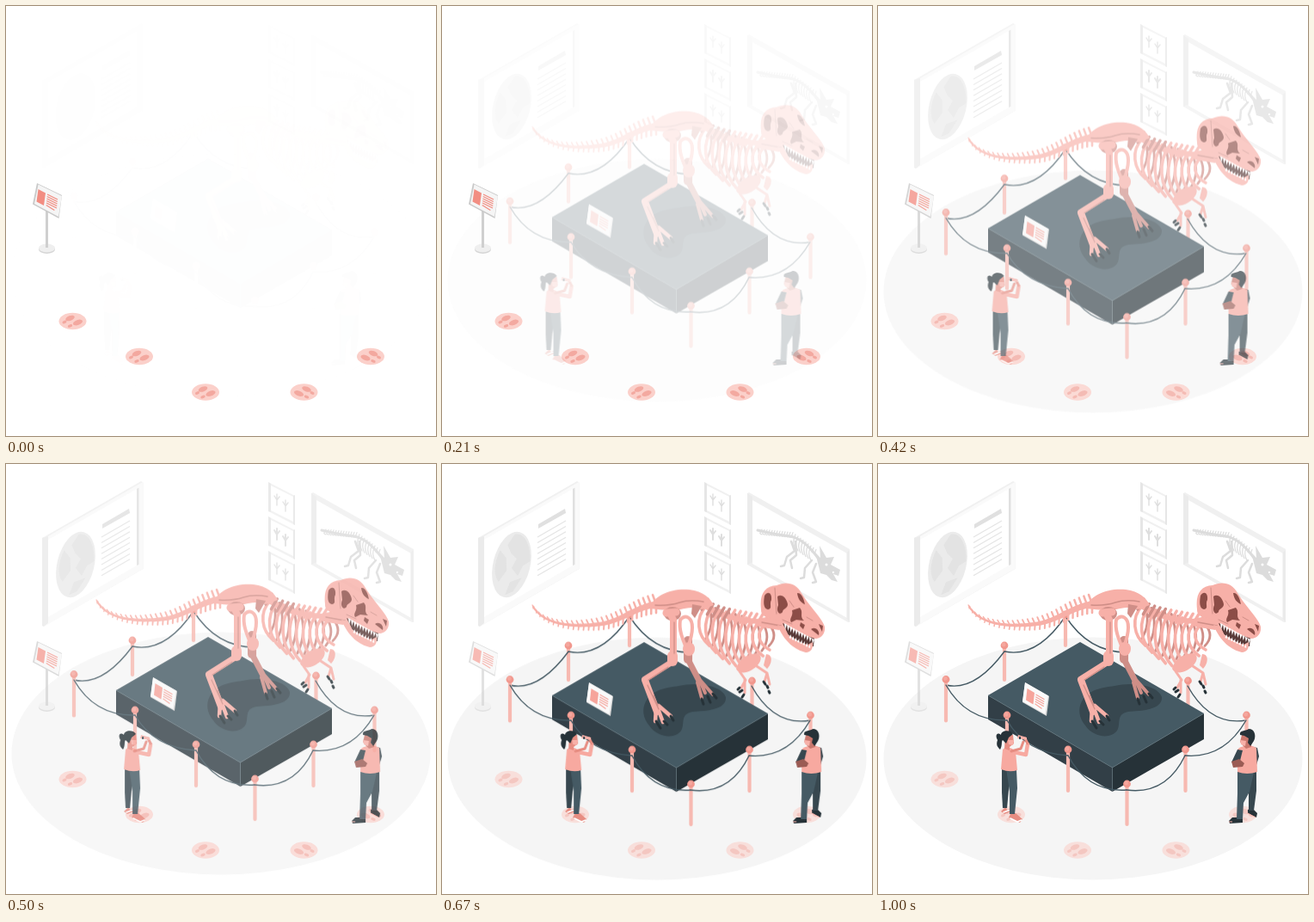
Recreate the animation shown at these times as an HTML page. Size 500 by 500 pixels, loop 1040 ms.

```html
<!DOCTYPE html>
<html lang="en">
<head>
<meta charset="utf-8">
<title>Museum hall</title>
<style>
html, body { margin: 0; width: 100%; height: 100%; overflow: hidden; background: #fff; }
svg { display: block; width: 100%; height: 100%; }
.drop, .slide, .fade, .mute {
  animation: 1s cubic-bezier(.28, -.01, .48, 1.38) var(--clock, 0ms) both paused;
}
.drop { animation-name: drop; }
.slide { animation-name: slide; }
.fade { animation-name: fade; }
.mute { animation-name: mute; animation-timing-function: linear; }
@keyframes drop { from { opacity: 0; transform: translateY(-30px); } to { opacity: 1; transform: none; } }
@keyframes slide { from { opacity: 0; transform: translateX(-30px); } to { opacity: 1; transform: none; } }
@keyframes fade { from { opacity: 0; } to { opacity: 1; } }
@keyframes mute { 0%, 20% { opacity: 1; } 50% { opacity: .68; } 67%, 100% { opacity: .6; } }
.line { fill: none; stroke-linecap: round; stroke-linejoin: round; }
.bone { fill: #f7b0a8; }
.dim { fill: #cf8e87; }
.hole { fill: #8c4d47; }
.claw { stroke: #263238; stroke-width: 3; }
</style>
</head>
<body>
<svg viewBox="0 0 500 500">
  <g class="drop"><ellipse cx="250" cy="342.5" rx="243.5" ry="141" fill="#f5f5f5"/></g>

  <g class="fade" id="wall">
    <!-- large panel, left -->
    <path d="M42 86 157 20 159.500 21.500V122L44 189 42 188Z" fill="#f0f0f0"/>
    <path d="M44 87 159 21V122L44 189Z" fill="#fafafa"/>
    <path d="M42 86 49 84V185L44 189 42 188Z" fill="#ebebeb"/>
    <path d="M49 88 152 29V118L49 178Z" fill="#fff"/>
    <path d="M152 29 154.500 27.500V117L152 118Z" fill="#e0e0e0"/>
    <g transform="rotate(14 81 117)">
      <ellipse cx="81" cy="117" rx="21.500" ry="39" fill="#ebebeb"/>
      <path d="M76 82C88 76 98 93 101 108L94 115 91 128 82 121 85 109 77 104 71 96ZM64 104 73 111 77 125 71 140C64 135 60 121 64 104ZM84 137 96 129 90 147 82 153Z" fill="#e3e3e3"/>
    </g>
    <path d="M112 70 143 52 144 57 112 75Z" fill="#e0e0e0"/>
    <!-- framed skeleton, right -->
    <path d="M355 34 357 33 474 99V184L472 184 355 117Z" fill="#f0f0f0"/>
    <path d="M361 42 471 104V179L361 116Z" fill="#fff"/>
    <path d="M355 34 361 38V114L355 117Z" fill="#ebebeb"/>
    <path d="M470.500 103 474 100V184L470.500 180Z" fill="#ebebeb"/>
    <g class="line" stroke="#dcdcdc" id="fossil">
      <path d="M367 77Q388 82 404 84T437 109" stroke-width="3"/>
      <path d="M406 90 410 101 401 108 398 118 394 119M411 90 412 106 405 112 407 121M430 112 422 121 421 132 417 133M435 116 431 126 435 137 431 138" stroke-width="2.500"/>
    </g>
    <path d="M434 103 440 109 439 95 447 109 456 108 452 117 463 123 461 130 455 128 460 137 453 135 447 129 440 127Z" fill="#dcdcdc"/>
    <g fill="#fff"><circle cx="447" cy="117" r="1.500"/><circle cx="455" cy="126" r="1.200"/></g>
  </g>

  <g class="mute">
    <g id="steps"></g>
    <ellipse cx="47.500" cy="283" rx="9.500" ry="5" fill="#d5d5d5"/>
    <ellipse cx="47.500" cy="281.500" rx="9.500" ry="5" fill="#efefef"/>
    <path d="M47.500 238V281" stroke="#cfcfcf" stroke-width="3"/>
    <path d="M36 206 65 220 61.500 247 31 230.500Z" fill="#c9c9c9"/>
    <path d="M37.500 207.500 65 221 61 245 33 230Z" fill="#f5f5f5"/>
    <path d="M37.500 213 46 217.500 44 232 35.500 227.500Z" fill="#f28d82"/>
    <g id="signLines" stroke="#f28d82" stroke-width="1.300"></g>
  </g>

  <g class="drop">
    <g id="backRail"></g>
    <path d="M128 269 272.500 353V381L128 297Z" fill="#323f47"/>
    <path d="M272.500 353 379 290V320L272.500 381Z" fill="#263238"/>
    <path d="M235 207 379 290 272.500 353 128 269Z" fill="#455a64"/>
    <path d="M128 269 272.500 353 379 290M272.500 353V380" fill="none" stroke="#5a6d76" stroke-width=".7"/>
    <path d="M237 276C245 262 260 260 275 258 295 253 326 257 330 271 331 286 306 287 291 288 276 291 283 302 278 310 270 321 249 317 241 304 234 296 232 285 237 276Z" fill="#37474f"/>
    <path d="M171 254 199 270 196 293 168 277Z" fill="#d9d9d9"/>
    <path d="M171 254 198 269.500 194.500 291 168 276Z" fill="#fafafa"/>
    <path d="M173.500 261 182 266 180.500 279.500 172 274.500Z" fill="#f6a49b"/>
    <g id="captionLines" stroke="#f6a49b" stroke-width="1.100"></g>

    <g id="dino">
      <g id="tail" class="line" stroke="#f7b0a8"></g>
      <!-- far leg -->
      <g class="line" stroke="#cf8e87">
        <path d="M286 205 286 227" stroke-width="10"/>
        <path d="M285 225 299 252" stroke-width="7"/>
        <path d="M299 250 306 266M297 254 302 272M301 252 315 268" stroke-width="4"/>
        <path class="claw" d="M302 273 304 279M309 270 312 277M315 267 319 272"/>
      </g>
      <g id="farRibs" class="line" stroke="#cf8e87" stroke-width="2.800"></g>
      <g id="ribs" class="line" stroke="#f7b0a8" stroke-width="3.600"></g>
      <g id="spine" class="line"></g>
      <!-- pelvis -->
      <path class="bone" d="M240 168C247 152 267 144 288 146 304 148 312 156 316 164L302 169C292 164 280 169 268 171 258 169 249 169 240 168Z"/>
      <path class="line" d="M248 164Q264 165 276 161T304 160" stroke="#cf8e87" stroke-width="1.500"/>
      <path class="line" d="M277 181C283 174 291 178 291 190 291 200 287 210 285 216 280 204 275 193 277 181Z" stroke="#f7b0a8" stroke-width="4"/>
      <path class="dim" d="M291 163 302 165 294 179 290 174Z"/>
      <ellipse class="bone" cx="287" cy="215" rx="7" ry="8"/>
      <!-- near leg -->
      <ellipse class="dim" cx="268" cy="174" rx="10" ry="8"/>
      <g class="line" stroke="#f7b0a8">
        <path d="M265 173 269 181 269 224" stroke-width="8"/>
        <path d="M261 173 272 172" stroke-width="9"/>
        <path d="M268 223 268 229" stroke-width="12"/>
        <path d="M266 231 236 250" stroke-width="7"/>
        <path d="M236 251 250 288" stroke-width="8"/>
        <path d="M249 283 248 299M251 284 257 300M252 281 266 293" stroke-width="4.500"/>
      </g>
      <path class="line" d="M270 184V220M263 236 240 251M239 257 252 285M246 269 251 281" stroke="#cf8e87" stroke-width="1.300"/>
      <path class="line claw" d="M249 299 254 307M258 299 262 303M266 293 269 298"/>
      <!-- shoulder and arms -->
      <path class="bone" d="M342 238C346 225 355 221 367 220 375 224 369 235 359 240 352 244 344 243 342 238Z"/>
      <path class="bone" d="M377 221C385 221 384 232 378 238L374 234Z"/>
      <g class="line" stroke="#f7b0a8" stroke-width="3">
        <path d="M366 235 378 243 375 253M378 243 381 256M346 241 353 251 348 260M352 251 352 266"/>
        <path class="claw" stroke-width="2" d="M374 253 376 256M378 258 379 260M380 264 381 266M346 260 344 262M349 263 346 265M351 268 349 271"/>
      </g>
      <!-- neck and skull -->
      <path class="bone" d="M368 179 392 177 401 187 392 193 368 189Z"/>
      <path class="line" d="M372 184 394 188" stroke="#cf8e87" stroke-width="1.500"/>
      <path d="M396 185 433 201 432 212 423 211 402 198Z" fill="#593a38"/>
      <path class="bone" d="M390 187 398 189 403 199 414 206 425 210 431 207C432 214 429 219 423 219 411 216 398 207 390 187Z"/>
      <path class="bone" d="M371 169C369 151 375 142 389 141 400 136 412 138 418 150L424 159C432 170 442 180 445 189 446 197 441 203 434 203L422 199 407 192 396 183 379 178C373 177 371 174 371 169Z"/>
      <path class="hole" d="M375 153C379 147 384 150 383 158 380 163 385 168 379 169 373 168 374 159 375 153ZM390 154C395 150 401 156 402 163 402 168 396 168 396 172 392 177 388 170 391 164ZM407 170 416 167C421 172 415 177 421 182L412 181 406 184C403 179 409 177 407 170ZM429 192C434 188 440 194 438 199ZM413 150C418 149 421 157 422 163 417 161 414 157 413 150ZM417 184 422 187 420 192 416 188ZM438 186 443 188 442 195Z"/>
      <path class="line" d="M387 144 389 174M404 159 409 166M424 178 431 182M396 181 407 186" stroke="#cf8e87" stroke-width="1"/>
      <g id="teeth" fill="#fff"></g>
    </g>
    <g id="frontRail"></g>
  </g>

  <!-- visitor taking a picture -->
  <g class="slide">
    <path d="M149 398 150 403 154 400 154 404 147 407 143 404ZM154 407 160 406 168 413 165 417 152 411Z" fill="#e78d82"/>
    <path d="M146 405 154 402M154 412 162 416 167 414" class="line" stroke="#fff" stroke-width="1.500"/>
    <path d="M144 353 154 354 152 379 150 400 145 400 144 382Z" fill="#37474f"/>
    <path d="M149 354 161 355 162 377 159 407 153 407 153 381Z" fill="#455a64"/>
    <path d="M145 332C149 327 157 330 160 335L162 356Q153 359 143 355Z" fill="#f7a9a0"/>
    <path class="line" d="M158 335 172 338 174 326" stroke="#f7a9a0" stroke-width="4.500"/>
    <path class="line" d="M155 334 166 331 169 323M174 325 171 319" stroke="#e78d82" stroke-width="3"/>
    <path d="M163 315 173 318 173 321 162 319Z" fill="#f7b0a8"/>
    <path d="M165 317V320" stroke="#37474f" stroke-width="2"/>
    <path d="M148 315H157L158 325 153 329 153 333 147 331Z" fill="#e78d82"/>
    <path d="M151 321 158 321 157 327 152 326Z" fill="#f7b0a8"/>
    <path d="M157 314C153 308 143 310 143 315 138 311 136 316 139 321 137 327 139 329 142 332 145 327 143 323 145 321L149 325 152 318Z" fill="#263238"/>
  </g>

  <!-- visitor with folded arms -->
  <g class="slide">
    <path d="M412 411 424 411 424 417 409 418 408 415ZM430 402 435 400 441 406 440 411 430 406Z" fill="#263238"/>
    <path d="M408 416H412M430 406 439 411" stroke="#f7b0a8" stroke-width="1"/>
    <path d="M428 358 440 357 440 380 437 403 431 403 431 380Z" fill="#37474f"/>
    <path d="M418 357 437 359 432 381 425 394 424 413 417 413 418 383Z" fill="#455a64"/>
    <path d="M436 329 441 330 443 340 440 350 434 349Z" fill="#37474f"/>
    <path d="M418 332C422 327 434 326 440 330L441 358Q429 362 418 358Z" fill="#f7a9a0"/>
    <path d="M418 332 424 333 421 345 411 347Z" fill="#37474f"/>
    <path d="M411 346 420 343 426 348 424 352 413 353Z" fill="#9b5b54"/>
    <path d="M423 315H435L434 329 428 331 424 327 421 323Z" fill="#c9776d"/>
    <path d="M421 321 428 322 427 328 422 326Z" fill="#f7b0a8"/>
    <path d="M421 315C420 309 427 311 431 308 438 308 440 316 437 322L433 328 430 324 431 319 426 316Z" fill="#263238"/>
  </g>
</svg>

<script>
const byId = id => document.getElementById(id);

function add(parent, tag, attrs) {
  const el = document.createElementNS('http://www.w3.org/2000/svg', tag);
  for (const key in attrs) el.setAttribute(key, attrs[key]);
  byId(parent).appendChild(el);
  return el;
}

const path = (parent, d, attrs = {}) => add(parent, 'path', { d, ...attrs });
const mix = (a, b, k) => a + (b - a) * k;

// Rows of slanted text strokes
function rows(parent, count, x, y, w, slope, gap, attrs) {
  for (let i = 0; i < count; i++)
    path(parent, `M${x - i * .25} ${y + i * gap}l${i === count - 1 ? w * .8 : w} ${w * slope}`, attrs);
}
rows('signLines', 6, 48, 219, 12, .5, 2.5);
rows('captionLines', 5, 183.5, 268, 10, .57, 2.7);
for (let i = 0; i < 8; i++)
  path('wall', `M111 ${85 + i * 6.4}l33 -19`, { stroke: '#e4e4e4', 'stroke-width': 1.2 });

// Three small framed prints
for (let i = 0; i < 3; i++) {
  const y = 21 + i * 40;
  path('wall', `M305 ${y}L336 ${y + 16}V${y + 50}L305 ${y + 34}Z`, { fill: '#f0f0f0' });
  path('wall', `M308 ${y + 4}L334 ${y + 17}V${y + 46}L308 ${y + 33}Z`, { fill: '#fff' });
  path('wall', `M305 ${y}l3 2v33l-3 -1ZM334 ${y + 16}l2 -1v35l-2 -1Z`, { fill: '#e6e6e6' });
  for (const [x, dy] of [[315, 20], [325, 27]])
    path('wall', `M${x} ${y + dy + 7}v-6l-3 -5m3 5l0 -7m0 7l3 -4`,
      { class: 'line', stroke: '#dedede', 'stroke-width': i === 1 ? 2 : 1.4 });
}

// Fossil ribs and tail spines in the right picture
for (let i = 0; i < 22; i++) {
  const x = 371 + i * 3, y = 78 + i * .3 + Math.max(0, i - 12) * 1.9;
  const rib = i > 12 && i < 20 ? 14 : 3;
  path('fossil', `M${x + 1} ${y - 2}l-1 3q-3 ${rib / 2} 1 ${rib}`, { 'stroke-width': 1.2 });
}

// Footprint discs on the floor
const discs = [[77.5, 366.5, 1], [155, 407.5, 1], [232, 449, 1], [346.5, 449, -1], [424, 407.5, -1]];
for (const [x, y, side] of discs) {
  const at = `translate(${x} ${y}) scale(${side} 1)`;
  add('steps', 'ellipse', { cx: x, cy: y, rx: 16, ry: 9.7, fill: '#fbd0ca' });
  for (const [cx, cy, rx, ry] of [[-3, -3.5, 5.5, 2.9], [-9.5, 1, 2.6, 1.7], [6, 1.5, 5.8, 2.9], [-3, 5.5, 2.8, 1.7]])
    add('steps', 'ellipse', { rx, ry, fill: '#f3a89f', transform: `${at} translate(${cx} ${cy}) rotate(-20)` });
}

// Barrier posts and ropes
const ropeStyle = { class: 'line', stroke: '#455a64', 'stroke-width': 1.4 };
function rail(parent, ropes, posts) {
  for (const [x, y, h] of posts)
    path(parent, `M${x} ${y}v${h}`, { class: 'line', stroke: '#f7b9b1', 'stroke-width': 4.2 });
  for (const [x1, y1, cx, cy, x2, y2] of ropes)
    path(parent, `M${x1} ${y1}Q${cx} ${cy} ${x2} ${y2}`, ropeStyle);
  for (const [x, y] of posts) {
    add(parent, 'circle', { cx: x, cy: y, r: 4.4, fill: '#f1978d' });
    add(parent, 'circle', { cx: x - .8, cy: y - 1, r: 2.4, fill: '#f5a79e' });
  }
}
rail('backRail',
  [[79, 257, 112, 265, 147, 218], [147, 218, 185, 226, 218, 177], [218, 177, 245, 219, 289, 219], [428, 298, 386, 305, 360, 258]],
  [[147, 211, 40], [218, 175, 36], [289, 213, 36], [360.5, 252, 46]]);
rail('frontRail',
  [[79, 257, 103, 299, 150, 298], [150, 298, 172, 336, 221, 339], [221, 339, 244, 382, 289, 379],
   [289, 379, 335, 385, 357, 339], [357, 339, 402, 343, 428, 298]],
  [[79, 250.5, 48], [150, 292, 47], [221, 332, 48], [289.5, 372, 47], [357.5, 332, 48], [428.5, 292, 47]]);

// Tail: a tapered chain of vertebrae
const tail = path('tail', 'M106 166C119 187 151 190 184 186 210 182 222 168 248 163', { 'stroke-width': 2 });
const tailLength = tail.getTotalLength(), bones = 27;
for (let i = 0; i < bones; i++) {
  const k = i / (bones - 1), a = tail.getPointAtLength(k * tailLength);
  const b = tail.getPointAtLength(Math.min(1, k + .025) * tailLength);
  const up = 2 + 9 * k, down = 2 + 8 * k;
  path('tail', `M${a.x} ${a.y}L${b.x} ${b.y}`, { 'stroke-width': 1.5 + 6 * k });
  path('tail', `M${a.x - 1 - k * 2} ${a.y - up}L${a.x + 1} ${a.y}L${a.x + k} ${a.y + down}`, { 'stroke-width': 1.2 + 1.4 * k });
}

// Ribs hang from a sloping spine
for (let i = 0; i < 10; i++) {
  const k = i / 9, x = mix(307, 377, k), y = mix(165, 186, k);
  const len = 46 + 22 * Math.sin(k * Math.PI) - 16 * k;
  path('farRibs', `M${x + 3} ${y}q${8 + 4 * k} ${len * .45} ${-4 + 4 * k} ${len * .85}`);
  path('ribs', `M${x} ${y}C${x - 13} ${y + len * .3} ${x - 10} ${y + len * .75} ${x + 4} ${y + len}`);
}
path('spine', 'M300 160Q327 184 382 183', { stroke: '#f7b0a8', 'stroke-width': 6 });
for (let i = 0; i < 12; i++) {
  const k = i / 11, x = mix(304, 374, k), y = mix(164, 183, Math.sqrt(k));
  path('spine', `M${x - 2} ${y + 5}L${x + 5} ${y - 7}`, { stroke: i < 5 ? '#cf8e87' : '#f7b0a8', 'stroke-width': 3.4 });
}

for (let i = 0; i < 11; i++) {
  const x = 398 + i * 3.2, y = 185 + i * 1.75;
  path('teeth', `M${x} ${y}l3 1.500l-2 ${6 - i * .15}Z`);
  if (i > 1 && i < 10) path('teeth', `M${x - 1} ${y + 14 - i * .2}l2.400 1l0 -5Z`);
}

// The clock advances in 24 fps ticks, after a short still opening
const LOOP = 1040, TICK = LOOP / 25, STILL = 130;
const start = performance.now();
function draw() {
  const t = (performance.now() - start) % LOOP;
  const tick = Math.min(24, Math.floor((t + 3) / TICK));
  const ms = t < STILL ? 45 : tick * 1000 / 24;
  document.documentElement.style.setProperty('--clock', `${-ms}ms`);
  requestAnimationFrame(draw);
}
draw();
</script>
</body>
</html>
```
